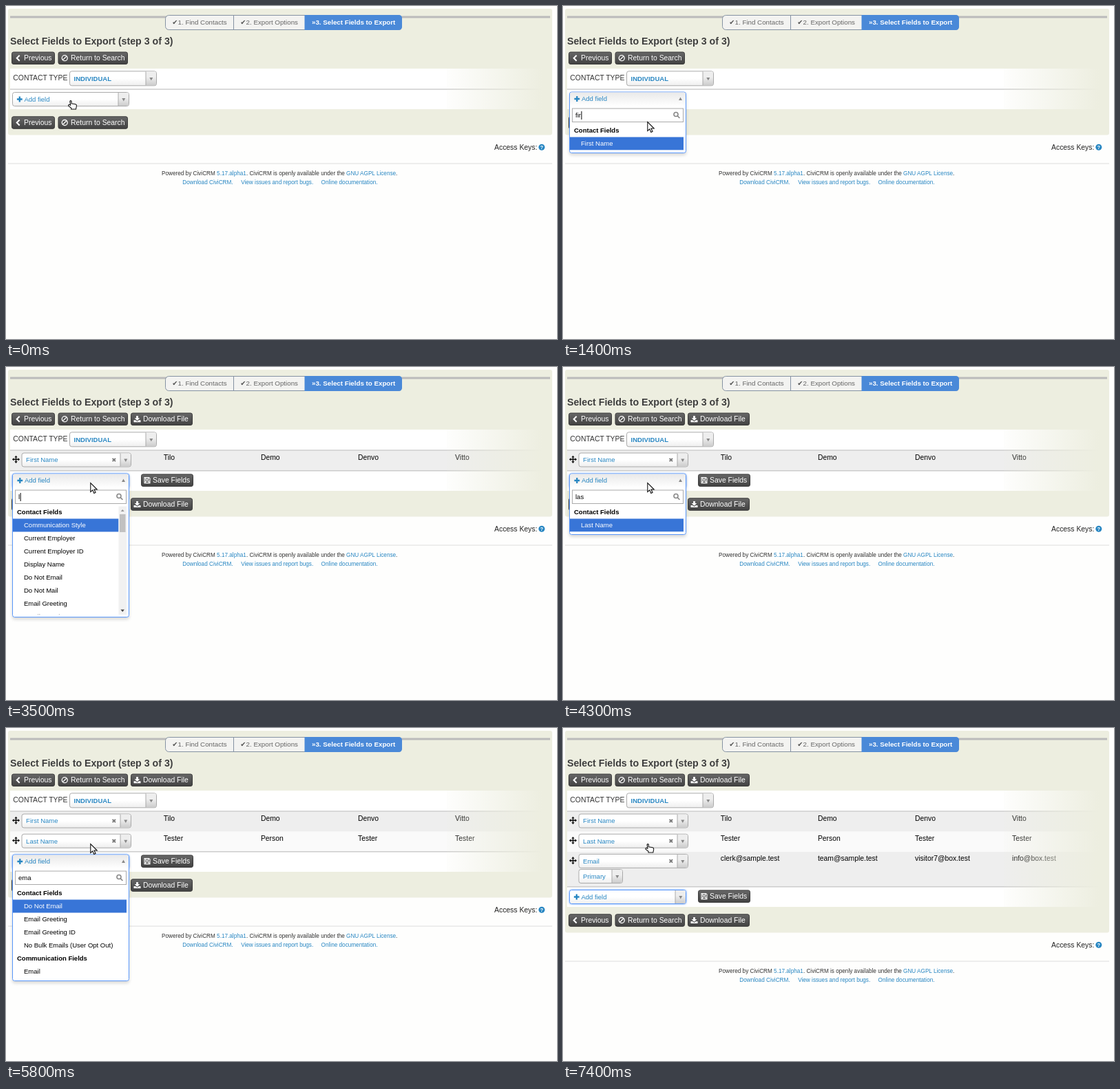
Recreate the animation shown at these times as an HTML page. Size 800x484 px, loop 8 s.

```html
<!DOCTYPE html>
<html lang="en">
<head>
<meta charset="utf-8">
<title>Select Fields to Export</title>
<style>
  html, body { margin: 0; width: 100%; height: 100%; overflow: hidden; background: #fefefd; }
  svg { display: block; width: 800px; height: 484px; font-family: "Liberation Sans", Arial, sans-serif; }
  text { white-space: pre; }
  .drop { filter: drop-shadow(0 3px 2px rgba(0, 0, 0, .15)); }
  .glow { filter: drop-shadow(0 0 1.5px rgba(88, 151, 251, .8)); }
</style>
</head>
<body>
<svg id="stage" viewBox="0 0 800 484"></svg>
<script>
const LOOP = 8000;
const LINK = '#2786c2', PANEL = '#edeee0', DARK = '#3e3e3e', FOCUS = '#5897fb';
const STEP = 29.2;                       // height of a plain row
const SHIFTS = [0, 30, 59, 110];         // offset of everything below the rows
const ITEM = 19, LIST_TOP = 47, LIST_MAX = 158;

const ROWS = [
  { name: 'First Name', data: ['Tilo', 'Demo', 'Denvo', 'Vitto'] },
  { name: 'Last Name', data: ['Tester', 'Person', 'Tester', 'Tester'] },
  { name: 'Email', data: ['clerk@sample.test', 'team@sample.test', 'visitor7@box.test', 'info@box.test'], type: 'Primary' }
];

const GROUPS = {
  'Contact Fields': ['Addressee', 'Addressee ID', 'Birth Date', 'Communication Style', 'Contact ID',
    'Contact Source', 'Contact Subtype', 'Contact Type', 'Current Employer', 'Current Employer ID',
    'Deceased Date', 'Display Name', 'Do Not Email', 'Do Not Mail', 'Do Not Phone', 'Email Greeting',
    'Email Greeting ID', 'First Name', 'Formal Title', 'Gender', 'Individual Prefix',
    'Individual Suffix', 'Job Title', 'Last Name', 'No Bulk Emails (User Opt Out)'],
  'Communication Fields': ['City', 'Email', 'Phone', 'Website']
};

const hand = (x, y) => ({ shape: 'hand', x, y });
const arrow = (x, y) => ({ shape: 'arrow', x, y });
const REST = [122.8, 168.5], HOVER = [119.3, 168];

// Each entry changes part of the state; a null query means the list is closed.
const EVENTS = [
  [0, { rows: 0, query: null, active: 0, focus: false, pointer: hand(90, 137) }],
  [600, { query: '', pointer: arrow(94, 138) }],
  [700, { pointer: arrow(...REST) }],
  [1100, { query: 'f' }],
  [1300, { query: 'fi' }],
  [1400, { query: 'fir' }],
  [2100, { rows: 1, query: null, focus: true, pointer: hand(...HOVER) }],
  [3500, { query: 'l', pointer: arrow(...REST) }],
  [3600, { query: 'la' }],
  [3800, { query: 'las' }],
  [4800, { rows: 2, query: null, pointer: hand(...HOVER) }],
  [5100, { query: 'e', pointer: arrow(...REST) }],
  [5200, { query: 'em' }],
  [5300, { query: 'ema' }],
  [6200, { active: 1 }],
  [6400, { active: 2 }],
  [6600, { active: 3 }],
  [6900, { active: 4 }],
  [7300, { rows: 3, query: null, active: 0, pointer: hand(...HOVER) }]
];

function stateAt(t) {
  const s = {};
  let typedAt = 0;
  for (const [at, change] of EVENTS) {
    if (at > t) break;
    Object.assign(s, change);
    if ('query' in change) typedAt = at;
  }
  s.caret = Math.floor((t - typedAt) / 500) % 2 === 0;
  return s;
}

// y is the middle of the capitals
const text = (x, y, str, size, fill = '#000', extra = '') =>
  `<text x="${x}" y="${y + size * .36}" font-size="${size}" fill="${fill}" ${extra}>${str}</text>`;
const rect = (x, y, w, h, fill, extra = '') =>
  `<rect x="${x}" y="${y}" width="${w}" height="${h}" fill="${fill}" ${extra}/>`;
const line = (x1, y, x2, color, width) =>
  `<path d="M${x1} ${y}H${x2}" stroke="${color}" stroke-width="${width}"/>`;
const at = (x, y, body) => `<g transform="translate(${x} ${y})">${body}</g>`;
const stroke = (d, color, width) =>
  `<path d="${d}" fill="none" stroke="${color}" stroke-width="${width}"/>`;
const fill = (d, color) => `<path d="${d}" fill="${color}"/>`;
const grad = (id, stops, dir = 'x2="0" y2="1"') => `<linearGradient id="${id}" ${dir}>` +
  stops.map(([o, c, a = 1]) => `<stop offset="${o}" stop-color="${c}" stop-opacity="${a}"/>`).join('') +
  '</linearGradient>';

// Icons are centred on 0,0
const ICON = {
  back: stroke('M2.2-4L-1.8 0L2.2 4', '#fff', 2),
  ban: stroke('M4 0A4 4 0 1 1-4 0A4 4 0 1 1 4 0M-2.8 2.8L2.8-2.8', '#fff', 1.3),
  load: fill('M-1.4-4.6H1.4V-1.4H3.8L0 2.2L-3.8-1.4H-1.4Z M-5 1.6H-2.4L0 3.6L2.4 1.6H5V4.6H-5Z', '#fff'),
  save: stroke('M-4-4H2.6L4-2.6V4H-4ZM-2.2-4V-1.2H1.6V-4M-2.4 4V1H2.4V4', '#fff', 1.1),
  plus: stroke('M-3.9 0H3.9M0-3.9V3.9', LINK, 2.3),
  move: stroke('M-4 0H4M0-4V4', '#111', 1.5) +
    fill('M0-5.6L2.2-3H-2.2ZM0 5.6L2.2 3H-2.2ZM-5.6 0L-3-2.2V2.2ZM5.6 0L3-2.2V2.2Z', '#111'),
  clear: stroke('M-2.2-2.2L2.2 2.2M2.2-2.2L-2.2 2.2', '#777', 1.8),
  find: stroke('M2-1A3 3 0 1 1-4-1A3 3 0 1 1 2-1M1.2 1.2L4.4 4.4', '#888', 1.6),
  down: fill('M-2.5-2H2.5L0 2.4Z', '#888'),
  up: fill('M-2.5 2H2.5L0-2.4Z', '#888')
};
const icon = (name, x, y) => at(x, y, ICON[name]);

const POINTERS = {
  hand: 'M2.8 1.3Q3.9 0 5 1.3V4.8L10.9 5.8Q12.7 6.3 12.4 8.4L11.5 13H4.7V11.2L.7 8.1Q.3 6.2 2 6.3L3.6 7.2Z',
  arrow: 'M0 0V13L3 10.3L5 14.9L7.2 13.9L5.2 9.5H9.4Z'
};

function button(x, y, w, name, label, labelX) {
  return rect(x + .5, y + .5, w - 1, 17.5, 'url(#btn)', 'rx="2.5" stroke="#3b3b3b"') +
    icon(name, (x + labelX - 1) / 2 + 1, y + 9.2) + text(labelX, y + 9.2, label, 10.4, '#fff');
}

function select(x, y, w, label, { plus, clear, focus, bold, h = 21 } = {}) {
  const mid = y + h / 2, edge = focus ? FOCUS : '#aaa';
  return rect(x + .5, y + .5, w - 1, h - 1, 'url(#sel)', `rx="3" stroke="${edge}" ${focus ? 'class="glow"' : ''}`) +
    fill(`M${x + w - 16} ${y + 1}h13q2 0 2 2v${h - 6}q0 2-2 2h-13z`, 'url(#arr)') +
    stroke(`M${x + w - 16} ${y + 1}v${h - 2}`, '#aaa', 1) +
    icon('down', x + w - 8.2, mid + .6) +
    (plus ? icon('plus', x + 10.8, mid) : '') +
    (clear ? icon('clear', x + w - 25.2, mid) : '') +
    text(x + (plus ? 17.5 : 6.6), mid, label, 9.5, LINK, bold ? 'font-weight="700"' : '');
}

function buttonBar(y, full) {
  return button(8, y, 63, 'back', 'Previous', 26) +
    button(75.5, y, 101.5, 'ban', 'Return to Search', 94) +
    (full ? button(181, y, 90, 'load', 'Download File', 199) : '');
}

function header() {
  return line(6, 16, 790, '#bbb', 3) +
    rect(231.5, 13.5, 343, 21, '#f3f3f1', 'rx="5" stroke="#8592a2"') +
    fill('M433.5 13H570q5 0 5 5v12q0 5-5 5H433.5z', '#4a89d8') +
    stroke('M330.5 13.5v21', '#8592a2', 1) +
    ['1. Find Contacts', '2. Export Options'].map((s, i) =>
      text(241.3 + i * 99, 23.5, '✔', 9.75, '#555', 'font-family="DejaVu Sans, sans-serif"') +
      text(249.6 + i * 99, 23.5, s, 9.75, '#666')).join('') +
    text(444, 23.5, '»3. Select Fields to Export', 9.75, '#fff', 'font-weight="700"') +
    text(6, 51, 'Select Fields to Export (step 3 of 3)', 14.2, DARK, 'font-weight="700"');
}

function fieldRow({ name, data, type }, i) {
  const y = STEP * i, h = type ? 51 : STEP;
  return rect(6, 121.5 + y, 784, h, i % 2 ? '#fafafa' : '#eee') +
    icon('move', 14.5, 134.3 + y) +
    select(22.5, 124.5 + y, 159.5, name, { clear: true }) +
    (type ? select(22.5, 205, 64.5, type) : '') +
    data.map((s, k) => text(228.8 + 141.1 * k, 131 + y, s, 10.4)).join('');
}

function footer(s) {
  const link = str => `<tspan fill="${LINK}">${str}</tspan>`;
  return text(709, 205.5 + s, 'Access Keys:', 10.4, '#222') +
    `<circle cx="777.8" cy="${205.3 + s}" r="4.5" fill="${LINK}"/>` +
    text(775.6, 205.4 + s, '?', 7.5, '#fff', 'font-weight="700"') +
    line(3, 229 + s, 793, '#ddd', 1) +
    text(226, 243 + s, `Powered by CiviCRM ${link('5.17.alpha1')}. CiviCRM is openly available under the ${link('GNU AGPL License')}.`, 8.2, '#333') +
    [[256.3, 'Download CiviCRM.'], [341.2, 'View issues and report bugs.'], [457.6, 'Online documentation.']]
      .map(([x, str]) => text(x, 256.3 + s, str, 8.2, LINK)).join('');
}

function matches(query) {
  const list = [];
  for (const [group, names] of Object.entries(GROUPS)) {
    const hits = names.filter(n => n.toLowerCase().includes(query));
    if (hits.length) list.push({ label: group, head: true }, ...hits.map(label => ({ label })));
  }
  return list;
}

function dropdown(top, { query, active }) {
  const list = matches(query), full = list.length * ITEM;
  const h = Math.min(full, LIST_MAX), scroll = full > LIST_MAX, right = scroll ? 163.5 : 175;
  let index = 0;
  const items = list.map(({ label, head }, i) => {
    const y = LIST_TOP + ITEM * i, mid = y + ITEM / 2;
    if (head) return text(16, mid, label, 9.5, '#000', 'font-weight="700"');
    const on = index++ === active;
    return (on ? rect(10, y, right - 10, ITEM, '#3875d7') : '') + text(26, mid, label, 9.5, on ? '#fff' : '#000');
  }).join('');
  const bar = rect(163.5, 48, 11.5, 157.5, '#f1f1f1') + rect(165, 59.5, 8.5, 26, '#c1c1c1') +
    fill('M169.2 52.5L171.7 55.5H166.7Z', '#999') + fill('M169.2 201.5L171.9 198H166.5Z', '#444');
  return at(0, top,
    rect(9.5, .5, 169, LIST_TOP + h + 3.5, '#fff', `rx="3" stroke="${FOCUS}" class="drop"`) +
    rect(10, 1, 168, 20, 'url(#open)', 'rx="2.5"') +
    icon('plus', 20.3, 10.5) + text(27, 10.5, 'Add field', 9.5, LINK) + icon('up', 170.5, 10.5) +
    rect(13.5, 24.5, 161, 19.5, '#fff', 'stroke="#aaa"') + icon('find', 165, 34) +
    text(18, 34.4, query, 9.5, '#000', 'id="query"') +
    `<clipPath id="list"><rect x="9" y="${LIST_TOP}" width="168" height="${h}"/></clipPath>` +
    `<g clip-path="url(#list)">${items}</g>` + (scroll ? bar : ''));
}

const DEFS = '<defs>' +
  grad('btn', [[0, '#676767'], [1, '#424242']]) +
  grad('sel', [[0, '#fff'], [.5, '#fff'], [1, '#eee']]) +
  grad('arr', [[0, '#eee'], [.4, '#eee'], [1, '#ccc']]) +
  grad('open', [[0, '#e9e9e9'], [1, '#fff']]) +
  grad('fade', [[0, PANEL, .08], [.92, PANEL, 1], [1, PANEL, 1]], '') +
  '</defs>';

const stage = document.getElementById('stage');

function draw(state) {
  const { rows, query, focus, caret, pointer } = state;
  const s = SHIFTS[rows], some = rows > 0;
  stage.innerHTML = DEFS +
    rect(3, 4, 790, 183.5 + s, PANEL, 'rx="3"') +
    header() + buttonBar(66.5, some) +
    rect(6, 91, 784, 59 + s, '#fff') +
    text(10.3, 104.5, 'CONTACT TYPE', 10.4, '#333') +
    select(92, 94.3, 127, 'INDIVIDUAL', { bold: true, h: 22 }) +
    ROWS.slice(0, rows).map(fieldRow).join('') +
    line(6, 121, 790, '#ccc', 1.6) +
    (some ? line(6, 120.7 + s, 790, '#ccc', 1.6) : '') +
    rect(640, 91, 150, 59 + s, 'url(#fade)') +
    select(9, 125 + s, 170, 'Add field', { plus: true, focus }) +
    (some ? button(196, 125.4 + s, 76, 'save', 'Save Fields', 213) : '') +
    buttonBar(160.3 + s, some) + footer(s) +
    (query === null ? '' : dropdown(124.5 + s, state)) +
    at(pointer.x, pointer.y, `<path d="${POINTERS[pointer.shape]}" fill="#fff" stroke="#111" stroke-width="1.1"/>`);
  const typed = document.getElementById('query');
  if (typed && caret) {
    const x = 18.5 + (query ? typed.getComputedTextLength() : 0);
    typed.insertAdjacentHTML('afterend', rect(x, 28.5, 1, 12, '#000'));
  }
}

let shown = '';
function tick() {
  const state = stateAt(performance.now() % LOOP);
  const key = JSON.stringify(state);
  if (key !== shown) {
    shown = key;
    draw(state);
  }
  requestAnimationFrame(tick);
}
tick();
</script>
</body>
</html>
```
